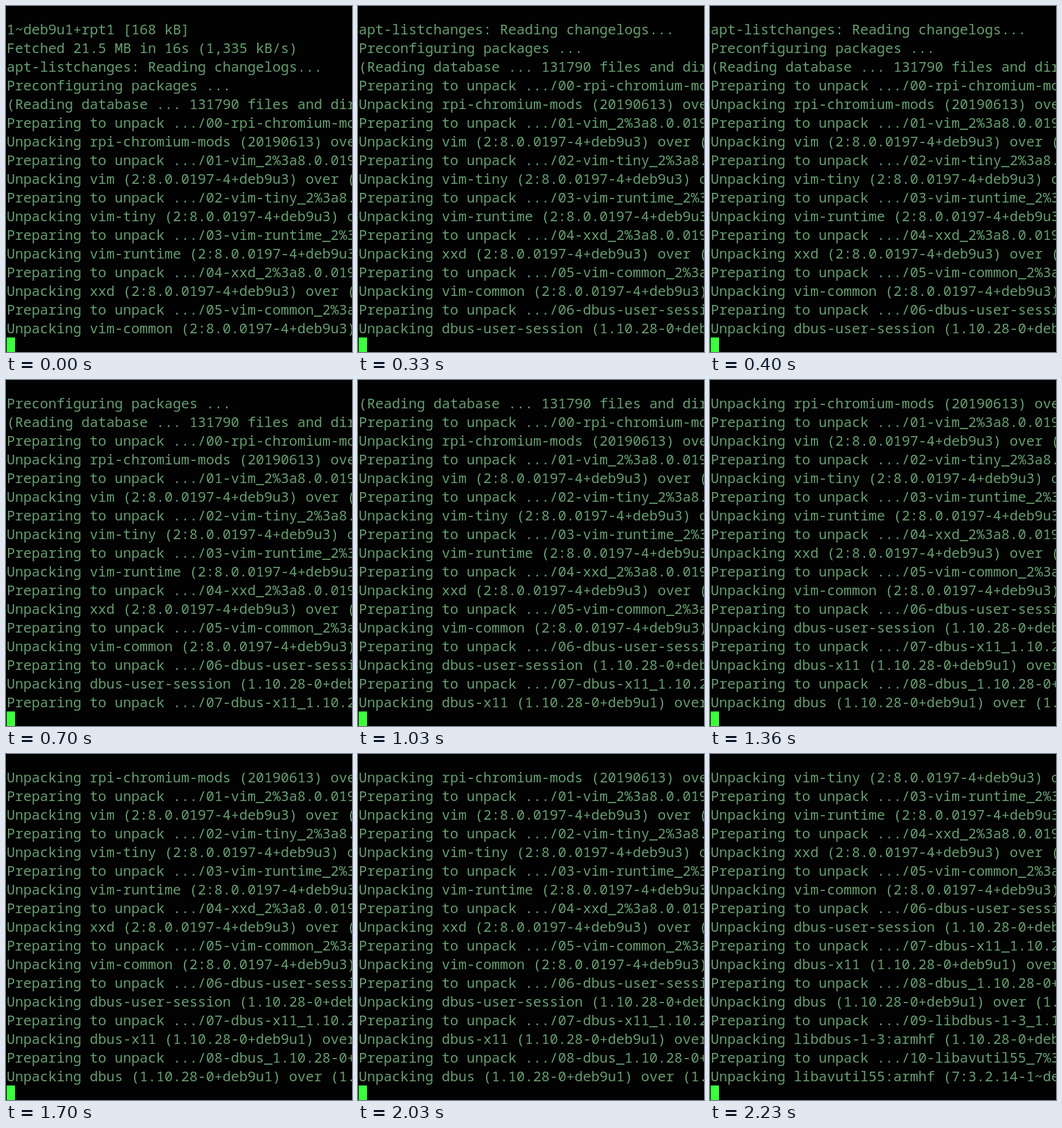
Animation, 500 px wide and 500 px high, one loop 2330 ms. Source, as an HTML page:

```html
<!DOCTYPE html>
<html lang="en">
<head>
<meta charset="utf-8">
<title>Package upgrade</title>
<style>
  html, body { margin: 0; width: 100%; height: 100%; overflow: hidden; background: #020203; }
  pre {
    box-sizing: border-box; width: 100%; height: 100%; margin: 0; padding: 20px 0 0 1px; overflow: hidden;
    font: 300 20px/27px "Noto Sans Mono", "DejaVu Sans Mono", monospace;
    font-variant-ligatures: none;
    color: #689e70;
  }
  #cursor { position: absolute; left: 1px; top: 479px; width: 12px; height: 21px; background: #3cff3c; }
</style>
</head>
<body>
<pre id="screen"></pre>
<div id="cursor"></div>
<script>
const LOOP = 2330, ROWS = 17, COLS = 42;

// package, version, architecture suffix
const vim = "2:8.0.0197-4+deb9u3", dbus = "1.10.28-0+deb9u1";
const packages = [
  ["rpi-chromium-mods", "20190613"],
  ["vim", vim],
  ["vim-tiny", vim],
  ["vim-runtime", vim],
  ["xxd", vim],
  ["vim-common", vim],
  ["dbus-user-session", dbus],
  ["dbus-x11", dbus],
  ["dbus", dbus],
  ["libdbus-1-3", dbus, ":armhf"],
  ["libavutil55", "7:3.2.14-1~deb9u1", ":armhf"]
];

const log = [
  "1~deb9u1+rpt1 [168 kB]",
  "Fetched 21.5 MB in 16s (1,335 kB/s)",
  "apt-listchanges: Reading changelogs...",
  "Preconfiguring packages ...",
  "(Reading database ... 131790 files and directories currently installed.)",
  ...packages.flatMap(([name, version, arch = ""], i) => [
    `Preparing to unpack .../${String(i).padStart(2, "0")}-${name}_${version.replace(":", "%3a")}_armhf.deb ...`,
    `Unpacking ${name}${arch} (${version}) over (${version.slice(0, -1)}0) ...`
  ])
].map(line => line.slice(0, COLS));

// [time in ms, lines scrolled so far]
const scrolls = [[0, 0], [30, 1], [130, 2], [500, 3], [800, 4], [1200, 5], [1260, 6], [2130, 8], [2230, 10]];

const screen = document.getElementById("screen");
const start = performance.now();
let shown = -1;

function draw() {
  const t = (performance.now() - start) % LOOP;
  const first = scrolls.findLast(([time]) => time <= t)[1];
  if (first !== shown) {
    shown = first;
    screen.textContent = log.slice(first, first + ROWS).join("\n");
  }
  requestAnimationFrame(draw);
}
draw();
</script>
</body>
</html>
```
